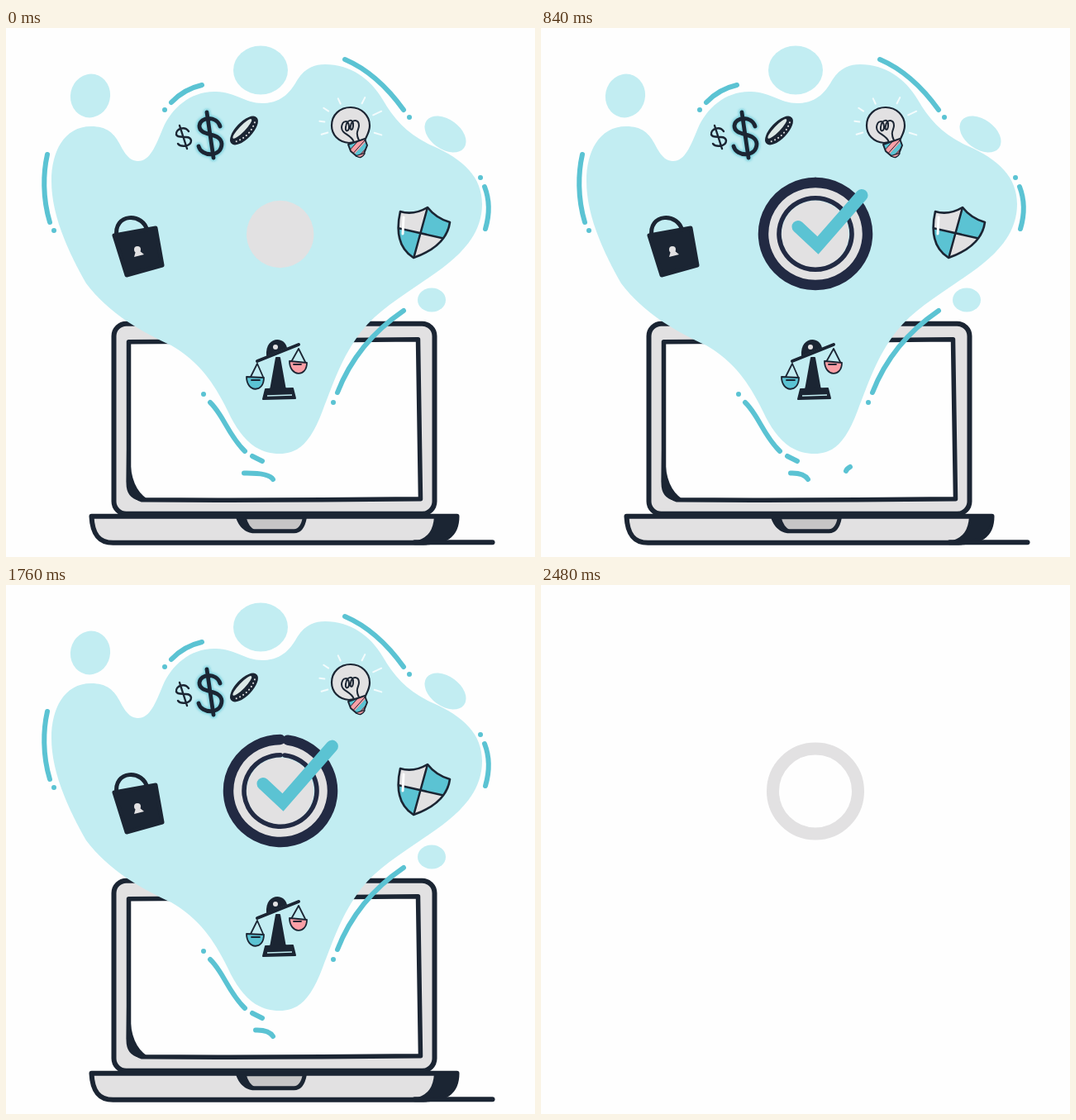
An HTML page for the animation above (2.5 s loop, 640x640 px).

```html
<!DOCTYPE html>
<html lang="en">
<head>
<meta charset="utf-8">
<title>Laptop check</title>
<style>
html, body { margin: 0; width: 100%; height: 100%; overflow: hidden; background: #fefefe; }
svg { display: block; width: 100vw; height: 100vh; }
.ink { stroke: #1b2533; stroke-linecap: round; stroke-linejoin: round; }
.dark { fill: #1b2533; }
.grey { fill: #e2e1e2; }
.teal { fill: #5bc3d3; }
.pink { fill: #fb9fa6; }
.line { fill: none; stroke: #5bc3d3; stroke-width: 6; stroke-linecap: round; stroke-linejoin: round; }
.arc { fill: none; stroke: #222a43; stroke-linecap: round; }
</style>
</head>
<body>
<svg viewBox="0 0 640 640">
  <defs>
    <filter id="soft" x="-50%" y="-50%" width="200%" height="200%"><feGaussianBlur stdDeviation="1.6"/></filter>
    <clipPath id="shieldClip"><path d="M477 222Q493 227 510 217Q520 230 537 235Q533 264 493 278Q468 262 477 222Z"/></clipPath>
    <clipPath id="baseClip"><path d="M414 141L434 134L437 142L433 152L424 155L417 149Z"/></clipPath>
  </defs>

  <g id="scene">
    <g id="laptop" class="ink" stroke-width="6" transform="translate(-.5 .8)">
      <rect class="grey" x="131" y="357" width="388" height="230" rx="15"/>
      <path d="M149 379L499 376L502 569Q320 571 165 570Q151 566 149 548Z" fill="#fefefe" stroke-width="5.5"/>
      <path class="dark" d="M149 379L150 520Q150 556 171 570H162Q147 567 147 550Z" stroke-width="2"/>
      <path class="grey" d="M104 590C105 612 113 622 130 622H500C533 622 546 613 546 590Z"/>
      <path class="dark" d="M520 590H547C545 613 535 622 495 622C513 617 519 607 520 590Z" stroke-width="3"/>
      <path d="M281 591H362Q359 608 349 608H299Q286 606 281 591Z" fill="#c6c5c6" stroke-width="5"/>
      <path class="dark" d="M281 591H290Q293 604 302 608Q286 607 281 591Z" stroke-width="2"/>
      <path d="M495 621.5H589" fill="none"/>
    </g>

    <g fill="#c2edf2">
      <path d="M55 185C55 150 70 119 103 119C122 119 131 127 139 143C147 158 153 161 160 161C174 161 181 143 190 121C200 98 222 77 252 77C278 77 290 92 312 91C335 90 345 76 353 62C362 48 374 44 386 44C416 44 441 61 456 87C469 110 487 130 517 143C553 159 576 180 576 213C576 250 550 276 513 301C478 325 449 343 430 367C406 398 396 430 383 463C369 500 355 515 331 515C301 515 285 495 272 471C257 440 240 407 200 384C165 368 125 346 97 309C69 260 55 220 55 185Z"/>
      <ellipse cx="102" cy="82" rx="24" ry="26.5" transform="rotate(12 102 82)"/>
      <ellipse cx="308" cy="51" rx="33" ry="29.5"/>
      <ellipse cx="531.5" cy="128.5" rx="28" ry="18" transform="rotate(36 531.5 128.5)"/>
      <ellipse cx="515" cy="329" rx="17" ry="14.5"/>
    </g>

    <g class="line">
      <path d="M50 153C45 175 44 205 53 235M58 245h.01"/>
      <path d="M192 99h.01M200 90Q215 74 237 69"/>
      <path d="M410 38C438 50 463 74 481 99M488 108h.01"/>
      <path d="M574 181h.01M579 192C586 210 585 226 580 243"/>
      <path d="M481 342C440 370 415 405 401 441M396 453h.01"/>
      <path d="M239 443h.01M247 453C263 468 269 493 289 512M298 518L310 524"/>
      <path id="dash"/>
      <path id="spark"/>
    </g>

    <g id="lock" transform="translate(-1 1)">
      <path class="ink" d="M135 252C130 222 168 222 172 245" fill="none" stroke-width="5"/>
      <path class="ink dark" d="M132 250L182 241L190 286L147 298Z" stroke-width="5"/>
      <circle class="grey" cx="160" cy="267" r="4"/>
      <path class="grey" d="M158 269L156 276L168 273L162 268Z"/>
    </g>

    <g id="shield">
      <g clip-path="url(#shieldClip)">
        <path class="grey" d="M465 205H550V290H465Z"/>
        <path class="teal" d="M510 217L502 248L545 258V205ZM502 248L465 240V290H491Z"/>
        <path class="ink" d="M510 217L493 279M470 241L540 257" stroke-width="2.5"/>
      </g>
      <path class="ink" d="M477 222Q493 227 510 217Q520 230 537 235Q533 264 493 278Q468 262 477 222Z" fill="none" stroke-width="2.6"/>
      <path d="M481 229L480 249" stroke="#fefefe" stroke-width="3" stroke-linecap="round"/>
    </g>

    <g id="bulb">
      <path id="rays" fill="none" stroke="#f4fcfd" stroke-width="2" stroke-linecap="round"/>
      <path class="ink grey" d="M415 139C402 138 394 129 394 118C394 105 404 96 417 96C430 96 440 106 440 118C440 126 436 131 434 136Z" stroke-width="2.2"/>
      <path class="ink" d="M421 138C417 128 406 129 406 120C407 111 415 111 415 119C415 126 410 126 411 120C412 110 421 109 420 118C420 125 415 124 417 118C419 109 427 111 427 118C427 124 422 125 427 136" fill="none" stroke-width="2"/>
      <g clip-path="url(#baseClip)">
        <path class="pink" d="M408 130H442V160H408Z"/>
        <path d="M411 149L428 130M420 158L440 136" stroke="#5bc3d3" stroke-width="5"/>
        <path class="ink" d="M413 151L431 131M417 155L434 136M424 158L440 141" stroke-width="1"/>
      </g>
      <path class="ink" d="M414 141L434 134L437 142L433 152L424 155L417 149Z" fill="none" stroke-width="2"/>
      <path class="ink pink" d="M424 155Q430 159 434 152" stroke-width="1.5"/>
    </g>

    <g id="money" fill="none">
      <g stroke="#5bc3d3" opacity=".7" stroke-width="8" stroke-linecap="round" filter="url(#soft)">
        <path d="M259 119C255 106 235 107 234 118C233 132 260 125 261 140C261 157 236 156 233 143M243 102L251 157"/>
      </g>
      <path class="ink" stroke-width="4.8" d="M259 119C255 106 235 107 234 118C233 132 260 125 261 140C261 157 236 156 233 143M243 102L251 157"/>
      <path class="ink" stroke-width="2.4" d="M221 125C216 118 205 122 206 129C208 135 222 128 224 136C224 144 211 144 208 140M210 118L219 146"/>
      <g transform="translate(288 124) rotate(-46)">
        <ellipse class="ink dark" rx="21" ry="9" stroke-width="2"/>
        <ellipse fill="#dce8e6" cx="0" cy="-3" rx="16" ry="3.6"/>
        <path d="M-16 2.5Q0 10 16 2.5" stroke="#e2e1e2" stroke-width="2" stroke-linecap="round" stroke-dasharray=".1 4.6"/>
      </g>
    </g>

    <g id="scales" transform="translate(0 1)">
      <path class="ink dark" d="M327 398H331L338 437H320ZM314 436L347 435L350 447L311 448Z" stroke-width="2"/>
      <path d="M316 444L346 443" stroke="#c2edf2" stroke-width="1.5"/>
      <path class="dark" d="M315 396C313 372 337 371 340 386Z"/>
      <path class="ink" d="M304 402L354 382" stroke-width="4"/>
      <circle cx="326" cy="385" r="3" class="grey"/>
      <g class="ink" stroke-width="1.8">
        <path d="M304 405L296 421M304 405L311 421M354 387L345 403M354 387L362 403" fill="none"/>
        <path class="teal" d="M291 421L312 422C312 441 291 440 291 421Z"/>
        <path class="pink" d="M343 402L364 404C364 422 343 421 343 402Z"/>
        <path d="M297 425H307M348 406H357" fill="none"/>
      </g>
    </g>

    <circle class="grey" cx="331.7" cy="249.5" r="40.7"/>
  </g>

  <circle id="band" cx="332" cy="249.5" fill="none" stroke="#e2e1e2"/>
  <g id="badge">
    <g transform="translate(0 249) scale(1 .984) translate(0 -249)">
      <path id="outer" class="arc" stroke-width="12.5"/>
      <path id="inner" class="arc" stroke-width="5.6"/>
    </g>
    <path id="check" fill="none" stroke="#5bc3d3" stroke-width="15" stroke-linecap="round" stroke-linejoin="miter"/>
  </g>
</svg>
<script>
const LOOP = 2500, STEP = 20, CX = 332, CY = 249;
const $ = id => document.getElementById(id);
const span = (t, a, b) => Math.min(1, Math.max(0, (t - a) / (b - a)));
const sine = u => (1 - Math.cos(Math.PI * u)) / 2;
const out = u => 1 - (1 - u) ** 2;
const settle = (t, a, tau) => 1 - Math.exp(-Math.max(0, t - a) / tau);
const show = (el, on) => el.setAttribute('visibility', on ? 'visible' : 'hidden');
const pulse = (t, a, b, c) => sine(span(t, a, b)) * (1 - sine(span(t, b, c)));

// Counter-clockwise arc from the top
function arc(id, r, deg) {
  const el = $(id), a = Math.min(deg, 359.99) * Math.PI / 180;
  const x = CX - r * Math.sin(a), y = CY - r * Math.cos(a);
  el.setAttribute('d', `M${CX} ${CY - r}A${r} ${r} 0 ${deg > 180 ? 1 : 0} 0 ${x} ${y}`);
  show(el, deg > 0);
}

function check(p) {
  const a = [311, 240.5], b = [335, 263], c = [394.5, 195];
  const l1 = Math.hypot(b[0] - a[0], b[1] - a[1]);
  const l2 = Math.hypot(c[0] - b[0], c[1] - b[1]);
  const at = (m, n, u) => [m[0] + (n[0] - m[0]) * u, m[1] + (n[1] - m[1]) * u];
  const d = p * (l1 + l2);
  const pts = d <= l1 ? [a, at(a, b, d / l1)] : [a, b, at(b, c, (d - l1) / l2)];
  $('check').setAttribute('d', 'M' + pts.join('L'));
  show($('check'), p > 0);
}

function draw(t) {
  const end = t >= 2480;
  $('badge').style.display = $('scene').style.display = end ? 'none' : '';

  const w = 15 * out(span(t, 0, 150));
  $('band').setAttribute('r', 44 + w / 2);
  $('band').setAttribute('stroke-width', w);
  show($('band'), w > 0);

  const gapOut = 8 * pulse(t, 1400, 1760, 2040);
  const gapIn = 17 * pulse(t, 900, 1260, 2140);
  arc('outer', 63, 360 * sine(span(t, 60, 684)) - gapOut);
  arc('inner', 44, 360 * sine(span(t, 100, 800)) - gapIn);
  check(settle(t, 274, 224));

  const x = 288 + 14 * out(span(t, 0, 600));
  $('dash').setAttribute('d', `M${x} 538.5Q318 538 323 546`);
  const s = pulse(t, 700, 840, 1000);
  $('spark').setAttribute('d', `M369 536q1 -3 ${.01 + 5 * s} ${-5 * s}`);
  show($('spark'), s > 0 && t < 1000 || t >= 2020 && t < 2140);
}

$('rays').setAttribute('d', [[-172, 32, 38], [-147, 32, 39], [-115, 29, 36], [-63, 30, 38], [-25, 30, 41], [17, 30, 39], [163, 29, 37]]
  .map(([deg, r1, r2]) => {
    const a = deg * Math.PI / 180;
    const p = r => `${417 + r * Math.cos(a)} ${118 + r * Math.sin(a)}`;
    return `M${p(r1)}L${p(r2)}`;
  }).join(''));

const start = performance.now();
function tick(now) {
  const t = Math.max(0, now - start) % LOOP;
  draw(Math.floor(t / STEP) * STEP);
  requestAnimationFrame(tick);
}
draw(0);
requestAnimationFrame(tick);
</script>
</body>
</html>
```
